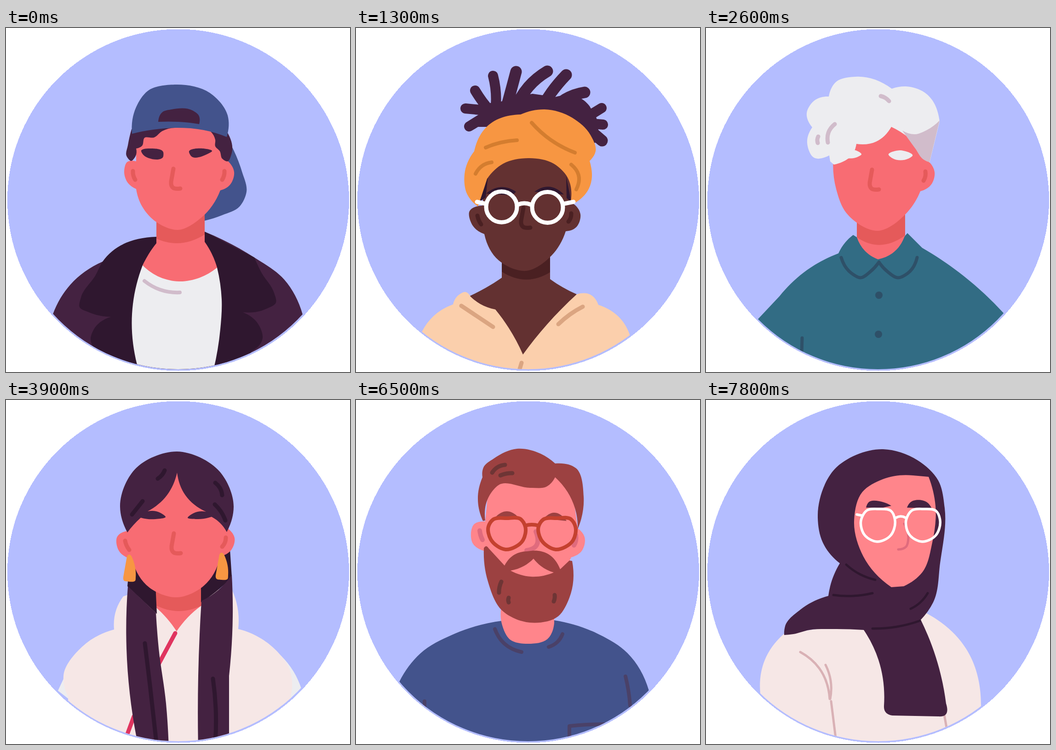
An HTML page for the animation above (8000 ms loop, 748 px wide and 748 px high).

```html
<!DOCTYPE html>
<html lang="en">
<head>
<meta charset="utf-8">
<title>Avatars</title>
<style>
html, body { margin: 0; width: 100%; height: 100%; overflow: hidden; background: #fff; }
svg { display: block; width: 100vw; height: 100vh; }
.bg { fill: #b4bdff; shape-rendering: crispEdges; }
.figure { clip-path: url(#disc); }
.line { fill: none; stroke-linecap: round; stroke-linejoin: round; }
</style>
</head>
<body>
<svg viewBox="0 0 748 748">
<defs><clipPath id="disc"><circle cx="374" cy="375" r="367"/></clipPath></defs>
</svg>
<script>
const svg = document.querySelector('svg');
const skin = '#f86c73', shade = '#e55a5a', pink = '#ff858b', rose = '#e06b7d';
const brown = '#633131', umber = '#4a2022', rust = '#9c4141', bark = '#6e3535';
const plum = '#442241', dark = '#2f172f', blue = '#43538c', teal = '#326c84', navy = '#2e5068';
const white = '#ededf0', cream = '#f6e7e6', lilac = '#d1bccb', orange = '#f79642';

let figure;

function add(parent, tag, attrs) {
  const el = document.createElementNS('http://www.w3.org/2000/svg', tag);
  for (const key in attrs) el.setAttribute(key, attrs[key]);
  return parent.appendChild(el);
}

function card() {
  const group = add(svg, 'g', { class: 'card' });
  add(group, 'circle', { class: 'bg', cx: 374.5, cy: 374, r: 371.5 });
  figure = add(group, 'g', { class: 'figure' });
}

// Bezier segments of a smooth curve through points, with chord-length tangents.
function curve(pts, loop) {
  const n = pts.length;
  if (n < 3) return pts.slice(1).map(p => 'L' + p).join('');
  const at = i => pts[(i + n) % n];
  const slope = i => {
    const dx = at(i + 1)[0] - at(i)[0], dy = at(i + 1)[1] - at(i)[1];
    const len = Math.hypot(dx, dy) || 1;
    return { dir: [dx / len, dy / len], len };
  };
  const tan = pts.map((_, i) => {
    const a = slope(i - 1), b = slope(i), w = a.len / (a.len + b.len);
    return a.dir.map((v, k) => v * (1 - w) + b.dir[k] * w);
  });
  if (!loop) {
    tan[0] = slope(0).dir.map((v, k) => 2 * v - tan[1][k]);
    tan[n - 1] = slope(n - 2).dir.map((v, k) => 2 * v - tan[n - 2][k]);
  }
  let d = '';
  for (let i = 0; i < (loop ? n : n - 1); i++) {
    const p = at(i), q = at(i + 1), s = slope(i).len / 3, t = tan[(i + 1) % n];
    d += 'C' + [p.map((v, k) => v + tan[i][k] * s), q.map((v, k) => v - t[k] * s), q];
  }
  return d;
}

// "x y x y / x y": smooth runs, with a corner at the point before each slash.
function path(text, closed) {
  const runs = text.split('/').map(run => {
    const v = run.trim().split(' ').filter(Boolean).map(Number);
    return v.filter((_, i) => i % 2 === 0).map((x, i) => [x, v[2 * i + 1]]);
  });
  const first = runs[0][0];
  let d = 'M' + first, last;
  if (runs.length === 1) return d + curve(runs[0], closed);
  if (closed) runs[runs.length - 1].push(first);
  for (const run of runs) {
    const pts = last ? [last, ...run] : run;
    d += curve(pts, false);
    last = pts[pts.length - 1];
  }
  return d;
}

const fill = (color, ...shapes) =>
  add(figure, 'path', { fill: color, d: shapes.map(s => path(s, true) + 'Z').join('') });
const stroke = (color, width, d) =>
  add(figure, 'path', { class: 'line', stroke: color, 'stroke-width': width, d });
const line = (color, width, ...strokes) =>
  stroke(color, width, strokes.map(s => path(s, false)).join(''));
const ring = (color, width, text) => stroke(color, width, path(text, true) + 'Z');
const dot = (x, y, r, attrs) => add(figure, 'circle', { cx: x, cy: y, r, ...attrs });
const nose = (x, y, color) => stroke(color, 9, `M${x} ${y}l-5 28c-1 14 6 17 20 15`);
const shift = (el, x, y) => {
  const copy = figure.appendChild(el.cloneNode());
  copy.setAttribute('transform', `translate(${x} ${y})`);
};

function capGuy() {
  card();
  fill(blue, '486 248 513 312 523 356 508 388 470 407 432 419 / 432 340 /');
  fill(plum, '102 622 140 558 210 508 / 327 455 / 432 443 / 540 499 605 547 645 623 / 650 760 / 90 760 /');
  fill(dark, '327 454 / 210 508 195 537 163 586 160 607 180 618 228 628 / 190 657 184 676 195 700 / 250 760 / 500 760 / 534 703 / 558 674 552 650 515 618 / 565 611 587 597 583 576 555 531 540 499 / 432 443 /');
  fill(white, '297 516 276 600 285 732 / 290 760 / 447 760 / 466 655 469 590 459 521 / 380 500 /');
  fill(skin, '327 400 / 327 468 / 310 492 297 516 / 335 542 376 551 421 543 459 521 / 447 490 432 465 / 432 400 /');
  fill(shade, '327 400 / 327 458 / 370 468 432 449 / 432 400 /');
  fill(skin, '283 205 / 283 290 / 264 291 257 312 266 338 283 350 / 296 388 327 422 374 439 425 412 466 353 / 487 341 496 313 482 289 / 470 205 /');
  fill(plum, '273 220 / 265 255 262 278 272 289 282 278 283 262 / 296 256 301 239 322 238 340 224 367 217 /',
    '445 225 / 455 243 455 257 465 268 470 284 482 290 490 275 486 236 / 478 220 /');
  fill(blue, '274 230 283 172 308 137 367 123 443 141 482 190 480 237 / 430 222 370 217 320 221');
  fill(plum, '331 204 / 340 183 360 177 405 179 419 190 420 209 / 375 204');
  fill(plum, '294 268 318 262 342 270 342 279 297 274', '398 270 428 262 448 268 440 273 402 278');
  nose(364, 306, shade);
  line(shade, 9, '276 311 277 321 281 330', '475 311 474 321 470 330');
  line(lilac, 8, '301 550 335 569 378 575');
}

function wrapGirl() {
  card();
  line(plum, 22, '246 214 285 190', '238 175 290 180', '259 136 275 160 305 195',
    '298 104 303 130 303 180', '534 174 500 195', '537 210 480 205');
  line(plum, 25, '348 95 340 125 325 180', '416 94 375 128 345 180', '457 102 425 140 400 180',
    '497 140 455 155 420 190', '535 245 500 215');
  fill(plum, '262 215 / 283 187 / 292 163 / 315 160 / 353 148 / 384 143 / 433 150 / 495 157 508 170 / 523 196 / 527 222 / 520 250 / 400 215 /');
  fill(brown, '317 490 / 317 543 / 282 565 240 586 / 300 640 / 363 720 / 480 579 / 450 564 422 546 / 422 490 /');
  fill(umber, '317 490 / 317 530 / 372 547 422 531 / 422 490 /');
  fill(brown, '275 386 / 247 398 254 430 279 448 / 310 505 370 528 425 495 456 442 / 479 433 488 405 470 380 / 470 300 / 377 270 / 280 310 /');
  fill(dark, '287 322 / 282 368 / 266 380 /', '457 322 / 468 378 / 458 370 /',
    '283 360 / 314 346 348 356 / 340 364 /', '388 356 / 418 345 452 362 /');
  fill(orange, '265 388 242 362 236 318 257 268 / 283 216 358 188 / 410 177 470 195 510 233 521 268 508 289 / 506 350 475 381 / 467 377 / 460 325 430 295 377 283 320 295 285 328 / 273 365');
  line('#d47d2f', 8, '282 260 315 249 350 244', '382 206 423 243 476 271', '260 317 274 300 295 292', '468 297 484 320 479 351');
  nose(364, 391, umber);
  line(umber, 9, '264 408 267 418 272 427', '468 403 467 412 462 421');
  line('#fff', 9, '263 378 281 382', '453 382 473 378', '352 384 366 381 380 384');
  const rim = { fill: 'none', stroke: '#fff', 'stroke-width': 9 };
  dot(316.5, 389, 33.5, rim);
  dot(416.5, 390, 33.5, rim);
  fill('#fbcfac', '143 661 168 627 211 601 / 224 580 238 574 249 584 / 270 600 303 612 / 332 652 363 710 / 415 645 480 579 / 510 580 527 602 / 575 632 596 669 / 600 760 / 140 760 /');
  line('#dba581', 9, '229 604 298 650', '493 606 465 623 440 644', '360 728 354 748');
}

function tealElder() {
  card();
  fill(teal, '113 633 / 160 583 / 212 532 288 490 / 303 466 320 450 / 328 455 / 374 495 / 430 455 / 438 446 / 470 478 / 560 539 648 621 / 650 760 / 110 760 /');
  fill(skin, '328 400 / 328 455 / 345 484 374 503 / 405 490 433 450 / 433 400 /');
  fill(shade, '328 400 / 328 455 / 367 471 433 451 / 433 400 /');
  fill(skin, '277 280 / 283 350 305 402 373 441 440 398 466 355 / 490 340 497 313 486 292 / 460 215 / 402 200 / 300 250 /');
  fill(white, '270 290 / 268 277 / 235 282 220 250 231 216 / 219 185 238 156 267 149 / 283 117 325 106 404 132 / 435 127 475 140 508 203 / 486 293 / 440 238 403 215 / 370 247 327 252 / 316 278 297 291 278 297 /');
  fill(white, '318 265 338 275 325 282 306 282', '397 276 422 266 449 278 440 284 405 283');
  fill(lilac, '508 201 480 222 455 231 427 223 / 455 262 473 286 486 292 /');
  line(lilac, 9, '380 148 390 152 398 159', '280 209 266 228 265 249', '244 236 242 243 243 250');
  nose(361, 308, shade);
  line(shade, 9, '477 312 477 322 473 332');
  line(navy, 7, '294 499 316 533 336 543 357 530 376 509 / 395 530 417 543 439 533 459 499', '209 674 208 708');
  dot(376, 581, 8, { fill: navy });
  dot(375, 666, 8, { fill: navy });
}

function longHair() {
  card();
  fill(white, '113 632 / 128 600 / 200 700 /', '598 556 / 625 590 642 627 / 600 690 /');
  fill(cream, '135 645 125 600 165 537 235 499 / 240 455 255 427 / 270 422 / 490 410 / 501 440 505 498 / 560 522 598 556 / 618 590 620 640 / 615 760 / 135 760 /');
  fill(skin, '325 400 / 325 450 / 350 475 371 503 / 395 473 425 447 / 425 400 /');
  fill(shade, '325 400 / 325 446 / 375 459 425 447 / 425 400 /');
  line('#e0345f', 9, '368 507 331 576', '278 688 264 726');
  fill(dark, '270 340 / 264 405 / 328 465 / 325 400 /', '487 325 / 491 385 / 455 418 424 440 / 424 400 / 470 335 /');
  fill(plum, '265 405 262 540 284 735 / 284 760 / 354 760 / 348 660 332 540 326 463 /',
    '491 380 493 470 485 600 / 485 760 / 418 760 / 418 600 425 437 / 462 413');
  fill(skin, '262 285 / 242 297 245 327 274 346 / 312 408 373 429 430 404 466 340 / 489 327 497 300 483 280 / 433 220 / 372 150 / 300 230 /');
  fill(plum, '264 288 248 232 280 151 372 112 465 156 495 232 480 287 / 465 267 447 254 / 415 259 395 256 408 246 435 243 / 390 207 372 158 / 350 207 308 242 / 335 245 347 254 325 259 293 256 / 277 272');
  line(dark, 9, '345 153 340 162 330 171', '297 220 274 249', '455 180 465 191 470 207', '454 227 467 242 477 262',
    '302 529 313 620 327 745', '450 606 456 670 455 745');
  nose(365, 290, shade);
  line(shade, 9, '259 306 262 316 268 326', '478 299 476 310 470 319');
  shift(fill(orange, '263 340 268 336 273 340 / 282 385 281 393 268 395 256 392 255 385 /'), 201, -4);
}

function tattooGirl() {
  card();
  fill(plum, '250 455 238 420 237 310 249 215 285 150 320 127 370 122 425 130 458 155 478 200 480 245 / 493 315 500 390 486 457 / 450 445 423 421 / 320 454 /');
  fill(dark, '283 340 / 284 400 293 456 / 322 453 / 322 395 /', '455 335 / 477 315 / 473 395 445 443 / 421 425 / 421 390 /');
  fill(skin, '125 645 / 140 580 190 528 / 207 517 / 320 460 / 320 390 / 422 390 / 422 452 / 535 522 / 560 541 / 605 585 621 648 / 620 760 / 130 760 /');
  fill(shade, '320 390 / 320 424 / 375 441 422 430 / 422 390 /');
  fill(skin, '281 345 278 285 287 232 / 312 215 324 168 / 321 205 327 229 / 357 231 388 229 / 397 210 395 168 / 400 205 412 227 / 449 228 / 471 275 / 486 290 479 325 459 338 / 428 399 366 421 312 392');
  fill(plum, '287 256 312 242 344 251 335 258 310 255 291 262', '389 254 416 241 446 255 440 260 416 253 393 259');
  fill(plum, '186 528 197 519 207 519 / 224 570 265 618 350 646 440 635 505 590 536 522 / 561 541 / 549 620 545 700 / 545 760 / 203 760 / 202 698 / 195 600');
  line(dark, 9, '421 168 424 179 423 190', '441 163 445 173 444 183', '260 406 260 418 263 431');
  line(dark, 2, '194 590 202 640 204 698');
  nose(364, 289, shade);
  line(shade, 9, '466 293 466 304 462 314');
  line(plum, 7, '407 547 416 546', '441 533 424 532 416 545 425 562 447 564 480 550 494 512 / 465 519 441 534 / 442 546 439 556');
  line(plum, 7, '494 528 517 553 / 504 558 / 484 541', '447 566 445 573', '475 558 480 570',
    '408 596 460 577 513 567', '366 618 380 596 408 591 / 395 613 366 618');
}

function beardGuy() {
  card();
  fill(blue, '94 613 140 551 215 508 318 480 / 431 479 / 525 508 590 550 637 632 / 640 760 / 90 760 /');
  fill(pink, '318 440 / 318 490 335 521 374 530 416 520 431 485 / 431 440 /');
  fill(pink, '281 264 / 258 269 254 312 281 329 / 330 400 / 440 400 / 468 342 / 491 328 497 298 482 279 / 470 190 / 430 160 / 290 170 /');
  line(rose, 10, '269 284 271 294 275 304', '478 294 478 306 474 316', '391 286 391 318 371 327');
  fill(rust, '276 263 265 215 275 168 / 277 147 300 127 350 106 402 117 433 138 / 478 148 495 210 482 281 / 476 235 460 200 433 168 / 415 188 380 191 310 185 290 208 281 262 /');
  fill(rust, '302 256 / 328 242 354 256 /', '408 258 / 430 245 458 263 /');
  fill(rust, '278 322 283 318 288 322 / 323 360 / 345 336 372 329 / 418 335 444 368 / 464 349 / 470 350 / 464 430 440 470 378 484 318 458 287 395');
  fill(pink, '336 371 / 365 361 386 345 / 402 361 430 375 / 380 384');
  shift(ring('#c4412f', 8, '298 260 328 257 358 259 368 275 363 305 325 325 293 303 288 275'), 109, 0);
  line('#c4412f', 8, '368 273 382 271 397 273');
  line(bark, 9, '296 158 308 146 324 141', '314 164 327 160 340 159', '316 395 312 407 311 419',
    '332 430 331 435 332 440', '432 424 432 431 430 438');
  line('#4a4168', 8, '302 498 323 530 360 548', '449 509 438 526 419 537', '586 601 592 630 596 664',
    '149 655 149 668', '464 740 464 709 / 500 706 540 705');
}

function scarfWoman() {
  card();
  fill(cream, '118 638 / 128 565 170 508 / 480 464 / 565 540 598 668 / 600 760 / 118 760 /');
  line('#d9b1b5', 5, '205 548 246 583 269 650', '260 576 271 610 270 650', '272 655 282 735', '518 684 523 712');
  fill(plum, '291 355 254 310 243 250 280 150 385 107 460 131 505 175 519 235 509 355 494 440 467 478 / 500 560 522 660 / 520 685 505 688 / 405 686 / 390 678 387 665 / 375 565 343 500 / 270 498 225 500 190 509 170 511 / 172 492 205 456 266 426 / 270 405');
  fill(pink, '403 407 342 340 322 265 340 200 385 172 450 164 / 484 167 / 499 230 492 310 470 375 430 405 /');
  fill(plum, '348 234 / 353 223 385 222 403 230 / 385 234 /', '437 234 / 445 222 480 222 491 236 /');
  line(rose, 5, '431 269 440 300 435 319 418 325');
  line(dark, 5, '305 358 335 379 368 391', '277 424 320 426 362 420', '362 497 415 493 465 480', '482 420 466 440 445 454');
  shift(ring('#fff', 5.5, '350 240 376 237 402 241 411 262 401 295 372 308 346 295 337 262'), 98, 0);
  line('#fff', 5.5, '413 256 423 253 434 256', '328 249 338 251');
}

[capGuy, wrapGirl, tealElder, longHair, tattooGirl, beardGuy, scarfWoman].forEach(draw => draw());

const LOOP = 8000, PERIOD = 1300, HOLD = 1000, STEP = 100, STEPS = 4;

// Each card dissolves over the one below it in equal hard steps.
document.querySelectorAll('.card').forEach((el, i) => {
  if (!i) return;
  const start = (i - 1) * PERIOD + HOLD;
  const frames = [{ opacity: 0, offset: 0 }];
  for (let k = 1; k <= STEPS; k++) {
    frames.push({ opacity: k / STEPS, offset: (start + (k - 1) * STEP) / LOOP });
  }
  frames.push({ opacity: 1, offset: 1 });
  frames.forEach(f => f.easing = 'steps(1, end)');
  el.animate(frames, { duration: LOOP, iterations: Infinity });
});
</script>
</body>
</html>
```
